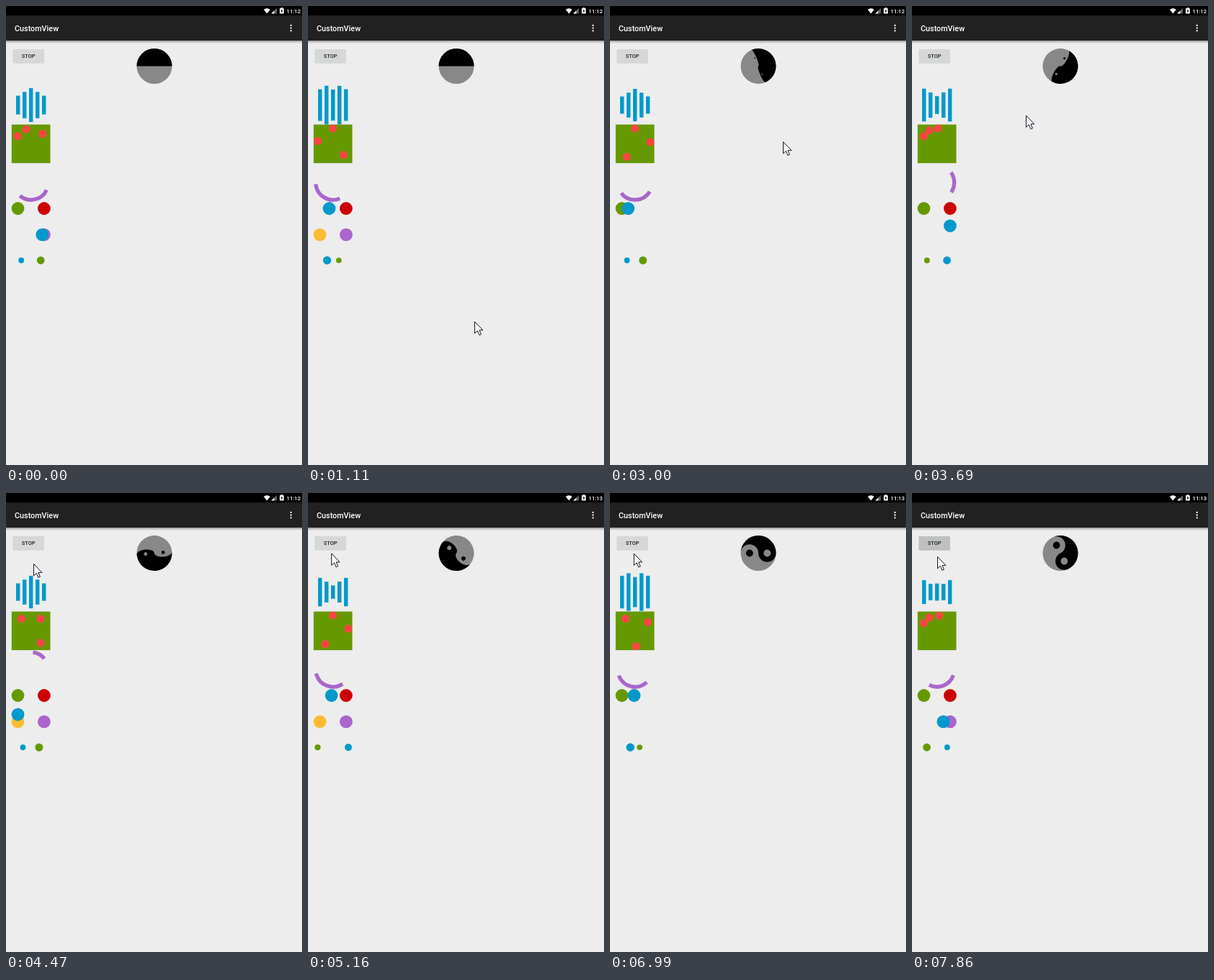
An HTML page that plays this animation: 411x637 px, repeating every 8000 ms.

```html
<!DOCTYPE html>
<html lang="en">
<head>
<meta charset="utf-8">
<title>CustomView</title>
<style>
  html, body { margin: 0; width: 100%; height: 100%; overflow: hidden; background: #ededed; }
  svg { display: block; width: 100vw; height: 100vh; }
  text { font-family: Roboto, "Open Sans", sans-serif; font-weight: 500; }
</style>
</head>
<body>
<svg id="stage" viewBox="0 0 411 637">
  <defs>
    <linearGradient id="shade" x2="0" y2="1">
      <stop stop-color="#000" stop-opacity=".38"/>
      <stop offset="1" stop-color="#000" stop-opacity="0"/>
    </linearGradient>
  </defs>
  <rect width="411" height="637" fill="#ededed"/>
  <rect y="47.5" width="411" height="4.5" fill="url(#shade)"/>
  <rect y="13" width="411" height="35" fill="#212121"/>
  <rect width="411" height="13.2"/>

  <!-- status bar -->
  <path d="M357.8 5Q362.3 1.6 366.8 5L362.3 10.6Z" fill="#fff"/>
  <path d="M368.3 10.6L376 3V10.6Z" fill="#666"/>
  <path d="M368.3 10.6L372.4 6.6V10.6Z" fill="#fff"/>
  <path d="M380 3.2H381.7V2.3H384.1V3.2H385.8V10.6H380Z" fill="#fff"/>
  <path d="M383.3 4.2L381.4 7.4H382.7V9.6L384.6 6.4H383.3Z"/>
  <text id="clock" x="389.6" y="9.8" font-size="7.7" fill="#fff">11:12</text>

  <!-- app bar -->
  <text x="12" y="35" font-size="10.8" fill="#fff">CustomView</text>
  <g fill="#fff">
    <circle cx="395.7" cy="27" r="1.15"/>
    <circle cx="395.7" cy="30.7" r="1.15"/>
    <circle cx="395.7" cy="34.4" r="1.15"/>
  </g>

  <rect id="button" x="9.3" y="60" width="43.7" height="19.7" rx="1.1" fill="#d6d7d7"/>
  <text x="31.2" y="72.4" font-size="7.4" text-anchor="middle" fill="#222">STOP</text>

  <g id="yinYang">
    <circle r="24.5" fill="#888"/>
    <path id="yin"/>
    <circle id="yinEye" cx="12.25" fill="#888"/>
    <circle id="yangEye" cx="-12.25"/>
  </g>

  <g id="bars" fill="#09c"></g>
  <rect x="7.8" y="164.5" width="53.7" height="53.6" fill="#690"/>
  <g id="balls" fill="#f44"></g>
  <path id="arc" fill="none" stroke="#a6c" stroke-width="5.3"/>
  <g id="corners"></g>
  <g id="dots"></g>
  <path id="cursor" d="M0 0V16.3L3.8 12.8 6.4 18.8 8.9 17.7 6.4 11.9H11.4Z" fill="#fff" stroke="#112" stroke-width="1"/>
</svg>
<script>
const LOOP = 8000, MID = 34.7;
const $ = id => document.getElementById(id);
const set = (el, attrs) => { for (const k in attrs) el.setAttribute(k, attrs[k]); };
const add = (id, tag, attrs) => {
  const el = document.createElementNS("http://www.w3.org/2000/svg", tag);
  set(el, attrs);
  return $(id).appendChild(el);
};
const mod = (a, n) => ((a % n) + n) % n;
const clamp = x => Math.min(1, Math.max(0, x));

// Piecewise linear lookup: each key is [x, value, ...]
function track(keys, x, col = 1) {
  const i = keys.findIndex(k => k[0] > x);
  if (i < 0) return keys[keys.length - 1][col];
  if (!i) return keys[0][col];
  const a = keys[i - 1], b = keys[i];
  return a[col] + (b[col] - a[col]) * (x - a[0]) / (b[0] - a[0]);
}

// The picture advances in steps: [first, last, count]
const steps = [0];
for (const [from, to, n] of [[120, 1110, 8], [1260, 2170, 8], [2310, 3270, 8], [3420, 4350, 8],
  [4470, 5460, 8], [5580, 6540, 8], [6690, 7590, 7], [7740, 7860, 2]])
  for (let i = 0; i < n; i++) steps.push(from + (to - from) * i / (n - 1));

const bars = [-2, -1, 0, 1, 2].map(i => add("bars", "rect", { x: 32 + 9 * i, width: 5.4 }));
const balls = [0, 1, 2].map(() => add("balls", "circle", { r: 5.5 }));
const square = [[-1, -1], [1, -1], [1, 1], [-1, 1]].map(([x, y]) => [MID + 18.2 * x, 299.2 + 18.2 * y]);
const corners = ["#690", "#c00", "#a6c", "#fb3"].map((fill, i) =>
  add("corners", "circle", { cx: square[i][0], cy: square[i][1], r: 8.9, fill }));
const eater = add("corners", "circle", { r: 8.9, fill: "#09c" });
const dots = ["#690", "#09c"].map(fill => add("dots", "circle", { cy: 353, fill }));

const sweepKeys = [[0, 0], [53, 46], [207, 98], [240, 115], [265, 108], [360, 0]];
const cursorKeys = [[480, 286, 585], [1110, 231.5, 438], [1900, 211.8, 74], [2180, 211.8, 74],
  [2850, 240.5, 188.5], [3300, 240.5, 188.5], [4250, 38.5, 98.5], [4600, 38.5, 98.5],
  [5200, 30.5, 78.5], [6600, 30.5, 78.5], [7300, 35.5, 88.5]];

function drawBars(t) {
  bars.forEach((bar, i) => {
    const u = mod(43 + 72 * t / 1477 + 10.5 * Math.abs(i - 2), 72);
    const h = 54 - Math.abs(36 - u);
    set(bar, { y: 137.5 - h / 2, height: h });
  });
}

function drawBalls(t) {
  const c = mod(t + 547, 2045);
  balls.forEach((ball, i) => {
    const turn = clamp((c - 281 * i) / 1482) ** 2;
    const a = (360 * turn - 30 * i) * Math.PI / 180;
    set(ball, { cx: MID + 21.4 * Math.sin(a), cy: 191.3 - 21.4 * Math.cos(a) });
  });
}

function drawArc(t) {
  const head = mod(220 + 360 * t / 987, 360);
  const point = deg => {
    const a = deg * Math.PI / 180;
    return `${MID + 24 * Math.sin(a)} ${245 - 24 * Math.cos(a)}`;
  };
  set($("arc"), { d: `M${point(head - track(sweepKeys, head))}A24 24 0 0 1 ${point(head)}` });
}

// The blue ball eats the corners on one lap and restores them on the next
function drawEater(t) {
  const e = mod(6.07 + t / 485.5, 8), side = Math.floor(e), f = e - side;
  const a = square[side % 4], b = square[(side + 1) % 4];
  set(eater, { cx: a[0] + (b[0] - a[0]) * f, cy: a[1] + (b[1] - a[1]) * f });
  corners.forEach((c, i) => set(c, { opacity: e >= i && e < i + 4 ? 0 : 1 }));
}

function drawDots(t) {
  dots.forEach((dot, i) => {
    const q = mod(t / 1477 + .093 + (i ? 0 : .5), 1), back = q < .5;
    const x = 21.5 * (1 - Math.abs(4 * q - 2)) * -1;
    const pos = back ? -21.5 + 86 * q : 21.5 - 86 * (q - .5);
    const near = 1 - Math.abs(x) / 21.5;
    const depth = 1 - Math.abs(pos) / 21.5;
    set(dot, { cx: MID + pos, r: back ? 4.1 - .4 * Math.min(depth, 1 + near) : 5 + 1.1 * depth });
  });
}

function drawYinYang(t) {
  const run = Math.max(0, t - 2085) / 4905, p = clamp(run), b = 12.25 * p;
  set($("yinYang"), { transform: `translate(206 83.5) rotate(${360 * run})` });
  set($("yin"), { d: `M-24.5 0A24.5 24.5 0 0 1 24.5 0A12.25 ${b} 0 0 1 0 0A12.25 ${b} 0 0 0 -24.5 0Z` });
  set($("yinEye"), { r: 4.9 * p });
  set($("yangEye"), { r: 4.9 * p });
}

function draw(t) {
  drawBars(t);
  drawBalls(t);
  drawArc(t);
  drawEater(t);
  drawDots(t);
  drawYinYang(t);
  set($("cursor"), {
    transform: `translate(${track(cursorKeys, t)} ${track(cursorKeys, t, 2)})`,
    opacity: t < 480 ? 0 : 1
  });
  set($("button"), { fill: t < 7700 ? "#d6d7d7" : "#bfc0c0" });
  $("clock").textContent = t < 5000 ? "11:12" : "11:13";
}

const start = performance.now();
function tick() {
  const t = (performance.now() - start) % LOOP;
  draw(steps.filter(s => s <= t).pop());
  requestAnimationFrame(tick);
}
draw(0);
tick();
</script>
</body>
</html>
```
